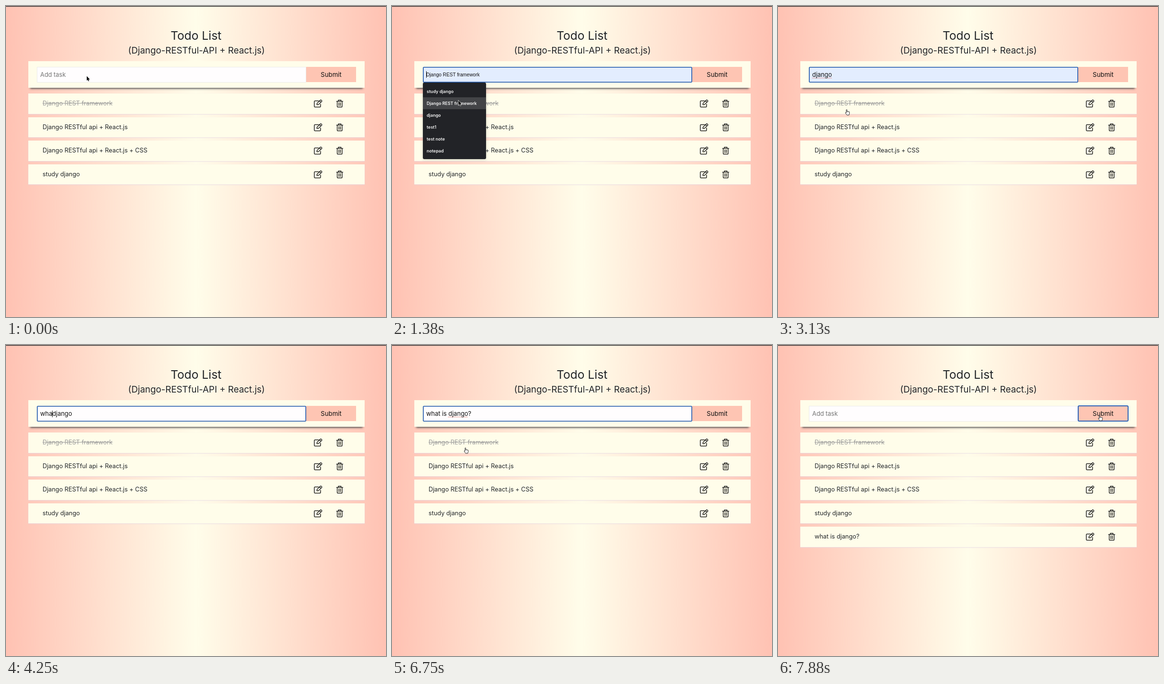
Animation, 800 px wide and 654 px high, one loop 8000 ms. Source, as an HTML page:

```html
<!DOCTYPE html>
<html lang="en">
<head>
<meta charset="utf-8">
<title>Todo List</title>
<style>
  html, body { margin: 0; width: 100%; height: 100%; overflow: hidden; }
  #app {
    position: relative; width: 800px; height: 654px; overflow: hidden;
    background: linear-gradient(90deg, #ffc2b3, #fffdea 50%, #ffc2b3);
    font: 12.9px Inter, sans-serif; color: #212529;
  }
  #app::before {
    content: ""; position: absolute; width: 100%; height: 1px;
    background: #262729; box-shadow: 0 1px rgba(38, 39, 41, .35);
  }
  #app div, #app svg { position: absolute; box-sizing: border-box; white-space: pre; }
  .title { left: 1px; width: 800px; text-align: center; line-height: 30px; }
  #app .big { left: 0; top: 47px; font-size: 24.8px; }
  #app .sub { top: 79px; font-size: 18.9px; }

  .form { left: 47px; top: 116px; width: 708px; height: 56px; background: #fffdea; box-shadow: 0 6px 4px -4px #555; }
  .field {
    left: 65px; top: 128px; width: 567px; height: 32.5px; padding-left: 6px; line-height: 31px;
    background: #fffdfe; border: 1px solid #ececea; color: #111;
  }
  .field:empty::before { content: "Add task"; color: #757575; }
  .hint::after { content: "Add task"; color: #757575; }
  .focus .field { border-color: #1650a8; border-radius: 2px; box-shadow: inset 0 0 0 .6px #1650a8; }
  .fill .field { background: #e3edfe; }
  .pre .field { font: 10.2px/32px "Liberation Sans", sans-serif; }
  .field i {
    display: inline-block; width: 1px; height: 14px; margin-right: -1px;
    vertical-align: -3px; background: #111;
  }
  .field u { text-decoration: underline dotted #e0503c 1.4px; text-underline-offset: 2px; text-decoration-skip-ink: none; }
  .submit {
    left: 632px; top: 128px; width: 105px; height: 32px; line-height: 32px;
    text-align: center; font-size: 13.3px; color: #111; background: #fec5b3;
  }
  .sent .submit { outline: 2px solid #2b62b8; outline-offset: -1px; border-radius: 2px; }

  .row {
    left: 47px; width: 708px; height: 42.6px; padding-left: 30px; line-height: 42.6px;
    background: #fffdea; box-shadow: 0 1px 2px rgba(228, 215, 228, .8); font-size: 12.8px;
  }
  .row:first-child { color: #999; text-decoration: line-through; }
  .row:last-child { visibility: hidden; }
  .added .row:last-child { visibility: visible; }
  .row svg { left: 600px; top: 11px; width: 66px; height: 20px; fill: none; stroke: #222; stroke-width: 1.5; stroke-linejoin: round; stroke-linecap: round; }

  .menu {
    left: 65px; top: 161px; width: 133px; height: 161px; padding-top: 6px; visibility: hidden;
    background: #222327; border-radius: 3px; box-shadow: 0 1px 6px rgba(0, 0, 0, .18);
    font-size: 9px; font-weight: 600; color: #f4f4f4;
  }
  .open .menu { visibility: visible; }
  .menu div { left: 0; width: 100%; height: 25px; padding-left: 8px; line-height: 25px; }
  .menu .hot { background: #434447; }
  #pointer { left: 0; top: 0; width: 800px; height: 654px; }
</style>
</head>
<body>
<div id="app">
  <div class="title big">Todo List</div>
  <div class="title sub">(Django-RESTful-API + React.js)</div>
  <div class="form"></div>
  <div class="field"></div>
  <div class="submit">Submit</div>
  <div class="list"></div>
  <div class="menu"></div>
  <svg id="pointer">
    <g>
      <path class="arrow" d="M0 0V9.6L2.1 7.6 3.5 10.8 5 10.1 3.7 7.1H6.6Z" stroke="#fff" stroke-width="1.2" paint-order="stroke"/>
      <path class="hand" d="M-.8 7.4V1.1a.85.85 0 0 1 1.7 0V5a.8.8 0 0 1 1.7 0a.8.8 0 0 1 1.7.3a.8.8 0 0 1 1.6.4V8.4L5 11.8H.5L-2.5 7.6a.8.8 0 0 1 1.2-1Z" fill="#fff" stroke="#222" stroke-width=".95"/>
    </g>
  </svg>
</div>
<script>
const LOOP = 8000, TICK = 125;
const $ = s => document.querySelector(s);
const app = $('#app'), field = $('.field'), pointer = $('#pointer g');
const arrow = $('.arrow'), hand = $('.hand');

const tasks = ['Django REST framework', 'Django RESTful api + React.js',
  'Django RESTful api + React.js + CSS', 'study django', 'what is django?'];
const hints = ['study django', 'Django REST framework', 'django', 'test1', 'test note', 'notepad'];

const icons = `<svg viewBox="0 0 66 20">
  <path d="M11 4.6H3.6a1.5 1.5 0 0 0-1.5 1.5V16a1.5 1.5 0 0 0 1.5 1.5h10.2a1.5 1.5 0 0 0 1.5-1.5V11.6M7.4 12.6L7.8 9.8 14.8 2.8a1.2 1.2 0 0 1 1.7 0L17.7 4a1.2 1.2 0 0 1 0 1.7L10.6 12.5ZM13.2 4.6L16 7.3"/>
  <path d="M48.9 5.4H62.1M52.6 5V2.9H58.4V5M50.4 5.6V16.4a1.2 1.2 0 0 0 1.2 1.2H59.4a1.2 1.2 0 0 0 1.2-1.2V5.6M53.9 8.6V14.6M57.1 8.6V14.6"/>
</svg>`;
$('.list').innerHTML = tasks.map((s, i) =>
  `<div class="row" style="top:${184 + i * 49.5}px">${s}${icons}</div>`).join('');
$('.menu').innerHTML = hints.map((s, i) =>
  `<div style="top:${6 + i * 25}px">${s}</div>`).join('');
const options = [...$('.menu').children];

// Each step overrides part of the state; caret -1 is the blink's off phase.
const start = { mode: '', text: '', caret: -1, mark: false, hot: -1 };
const preview = hot => ({ mode: 'focus open fill pre', hot, text: hints[hot] });
const type = (n, caret = n) => ({ mode: 'focus', mark: false, text: 'what is '.slice(0, n) + 'django', caret });
const steps = [
  [125, { mode: 'focus', caret: 0 }],
  [250, { mode: 'focus open' }],
  [750, { caret: -1 }],
  [1125, preview(0)],
  [1250, { ...preview(1), caret: 0 }],
  [1750, { caret: -1 }],
  [1875, preview(2)],
  [2250, { caret: 0 }],
  [2625, { mode: 'focus fill', hot: -1, caret: 6 }],
  [2875, { mark: true }],
  [3000, { caret: -1 }],
  [3375, { caret: 6 }],
  [3750, { caret: 0 }],
  [4000, type(1)],
  [4125, type(2)],
  [4250, type(3)],
  [4500, type(4)],
  [4625, type(5)],
  [4750, type(6)],
  [4875, type(7)],
  [5250, type(8)],
  [5500, type(8, 9)],
  [5625, type(8, 10)],
  [5750, type(8, 14)],
  [6000, { text: tasks[4], caret: 15 }],
  [6125, { mark: true }],
  [6250, { caret: -1 }],
  [7625, { mode: 'sent' }],
  [7750, { mode: 'sent added', text: '', mark: false }]
];

const paths = [
  [[0, 170, 147.5], [500, 162, 149], [875, 162, 149], [1125, 150, 176], [1375, 140, 199],
   [1750, 137, 211], [1875, 135, 220], [2125, 132.5, 231], [2625, 134, 230], [3125, 144.5, 217.5], [3750, 144.5, 217.5]],
  [[6750, 154.5, 216], [6875, 182, 211], [7250, 540, 166], [7500, 677, 147.5], [8000, 677, 147.5]]
];

function locate(t) {
  const path = paths.find(p => t >= p[0][0] && t < p[p.length - 1][0]);
  if (!path) return null;
  const i = path.findIndex(p => p[0] > t);
  const [t0, x0, y0] = path[i - 1], [t1, x1, y1] = path[i];
  const k = (t - t0) / (t1 - t0);
  return [x0 + (x1 - x0) * k, y0 + (y1 - y0) * k];
}

function fieldHtml({ text, caret, mark }) {
  const at = Math.max(caret, 0);
  const html = text.slice(0, at) + (caret < 0 ? '' : '<i></i>') + text.slice(at);
  return mark ? html.replace('django', '<u>django</u>') : html;
}

let last = -1;
function render(t) {
  // Ticks fall every 125 ms, rounded up to whole hundredths of a second.
  const now = Math.floor(Math.floor(t / 10) / 12.5) * TICK;
  if (now === last) return;
  last = now;

  const s = Object.assign({}, start, ...steps.filter(e => e[0] <= now).map(e => e[1]));
  app.className = s.mode;
  field.innerHTML = fieldHtml(s);
  field.classList.toggle('hint', !s.text && s.caret >= 0);
  options.forEach((o, i) => o.classList.toggle('hot', i === s.hot));

  const at = locate(now);
  pointer.style.display = at ? '' : 'none';
  if (!at) return;
  const link = !s.mode.includes('open') && (at[1] > 184 || at[0] > 632);
  arrow.style.display = link ? 'none' : '';
  hand.style.display = link ? '' : 'none';
  pointer.setAttribute('transform', `translate(${at})`);
}

const begin = performance.now();
function frame() {
  render((performance.now() - begin) % LOOP);
  requestAnimationFrame(frame);
}
render(0);
requestAnimationFrame(frame);
</script>
</body>
</html>
```
